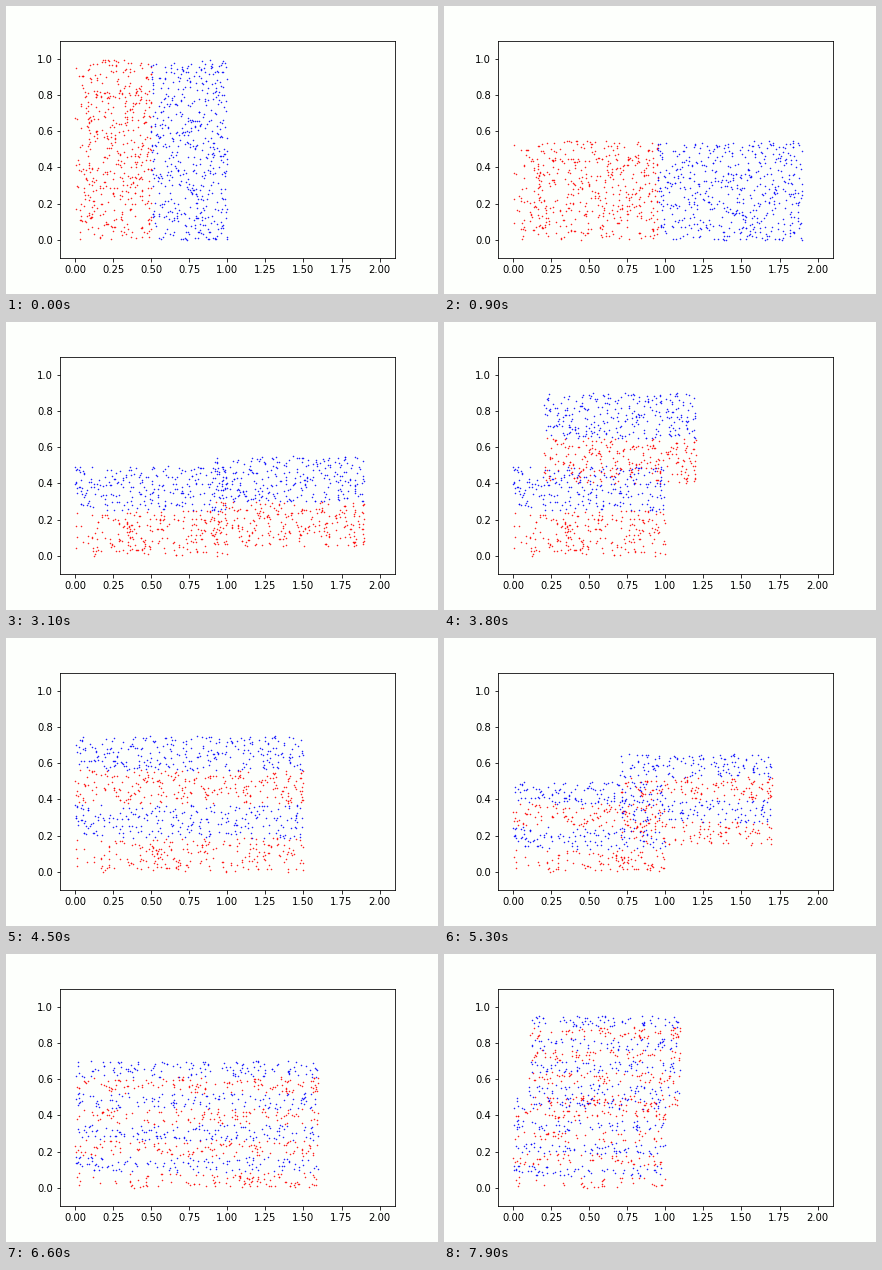
Animation, 432 px wide and 288 px high, one loop 8000 ms. Source, as a matplotlib script:

```python
import numpy as np
import matplotlib.pyplot as plt
from matplotlib.animation import FuncAnimation

STEPS = 10      # frames per stretch or per fold
FRAMES = 80
COUNT = 1000
PAPER = "#fdfffc"

plt.rcParams.update({
    "font.family": "DejaVu Sans",
    "font.size": 10,
    "figure.facecolor": PAPER,
    "axes.facecolor": PAPER,
})


def seed_points():
    rng = np.random.default_rng(4)
    pts = rng.random((COUNT, 2))
    # the strip along the left edge is nearly empty
    thin = (pts[:, 0] < 0.0275) & (rng.random(COUNT) > 0.12)
    pts[thin, 0] = 0.03 + 0.47 * rng.random(thin.sum())
    pts[:2] = [(0.002, 0.17), (0.001, 0.67)]
    return pts[:, 0], pts[:, 1]


def stretch(x, y, s):
    return x * (1 + s), y * (1 - s / 2)


def fold(x, y, s):
    right = x >= 1
    return x - s * right, y + 0.5 * s * right


def baker(x, y, step):
    """Positions after the given number of animation steps."""
    turns, rest = divmod(step, 2 * STEPS)
    for _ in range(turns):
        x, y = fold(*stretch(x, y, 1), 1)
    x, y = stretch(x, y, min(rest / STEPS, 1))
    if rest > STEPS:
        x, y = fold(x, y, rest / STEPS - 1)
    return x, y


x0, y0 = seed_points()
left = x0 < 0.5

fig, ax = plt.subplots(figsize=(6, 4), dpi=72)
fig.subplots_adjust(left=0.125, right=0.9, bottom=0.125, top=0.88)
ax.set_xlim(-0.1, 2.1)
ax.set_ylim(-0.1, 1.1)

groups = [(ax.plot([], [], ".", color=color, ms=1)[0], mask)
          for color, mask in (("red", left), ("blue", ~left))]


def update(i):
    x, y = baker(x0, y0, i)
    for dots, mask in groups:
        dots.set_data(x[mask], y[mask])
    return [dots for dots, _ in groups]


anim = FuncAnimation(fig, update, frames=FRAMES, interval=100,
                     repeat=True, repeat_delay=0)
plt.show()
```
